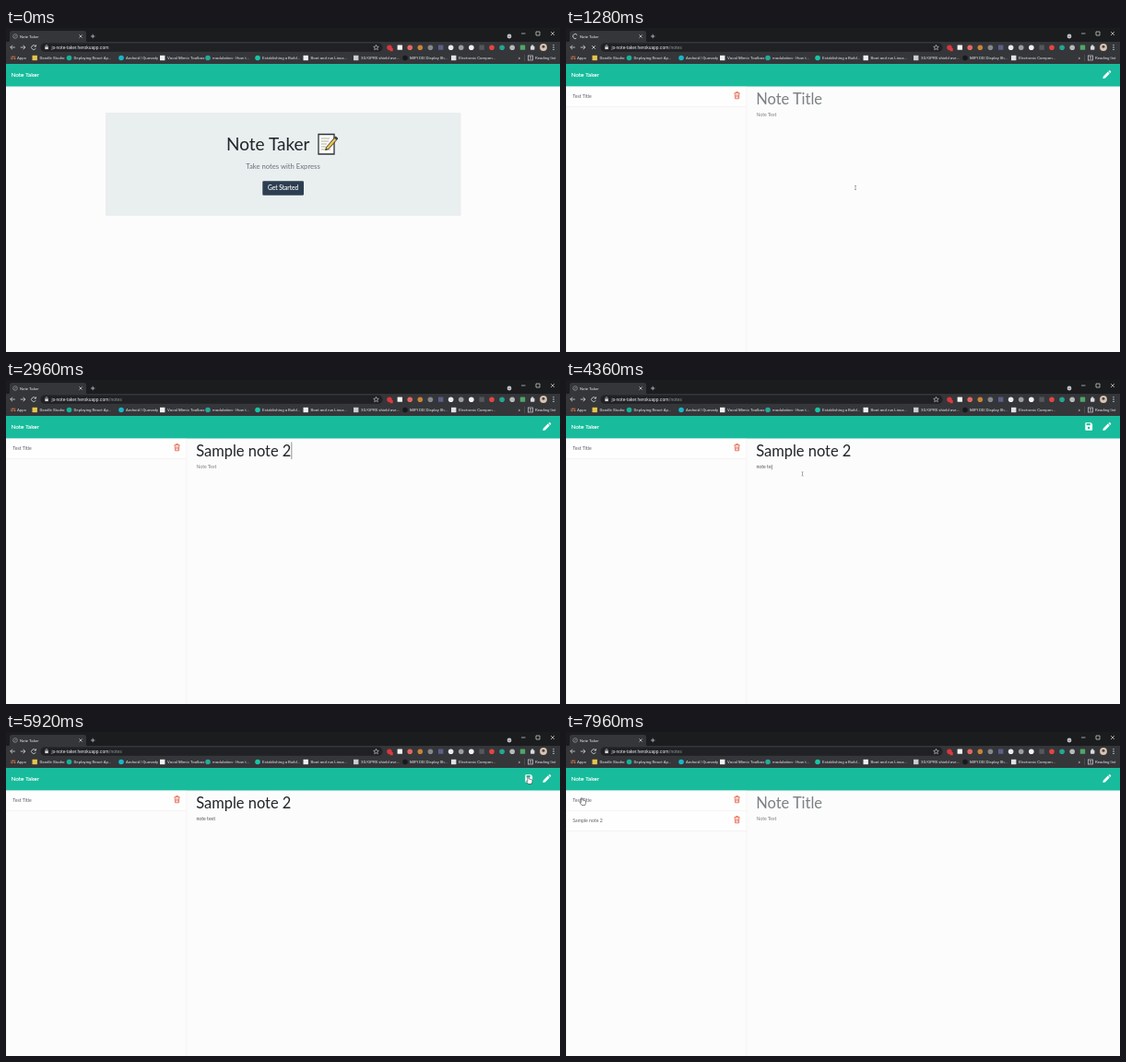
An HTML page for the animation above (8000 ms loop, 601 px wide and 352 px high).

```html
<!DOCTYPE html>
<html lang="en">
<head>
<meta charset="utf-8">
<title>Note Taker</title>
<style>
  html, body { margin: 0; width: 100%; height: 100%; overflow: hidden; background: #fcfcfc; }
  svg { display: block; width: 100vw; height: 100vh; }
  text { white-space: pre; }
  .ui { font-family: Roboto, "Open Sans", sans-serif; fill: #e4e5e8; }
  .page { font-family: Lato, sans-serif; }
</style>
</head>
<body>
<svg id="stage" viewBox="0 0 601 352" preserveAspectRatio="none"></svg>
<script>
const LOOP = 8000;
const TITLE = "Sample note 2", BODY = "note text";
const T = { show: 40, click: 700, load: 760, notes: 1120, ready: 1300, focus: 1640,
            type: 1840, textFocus: 3740, textType: 3860, blur: 5860, save: 6240 };

const rect = (x, y, w, h, fill, more = "") =>
  `<rect x="${x}" y="${y}" width="${w}" height="${h}" fill="${fill}" ${more}/>`;
const disc = (x, y, r, fill, more = "") => `<circle cx="${x}" cy="${y}" r="${r}" fill="${fill}" ${more}/>`;
const line = (d, color, w = .8, more = "") =>
  `<path d="${d}" fill="none" stroke="${color}" stroke-width="${w}" ${more}/>`;
const text = (x, y, size, str, more = "") => `<text x="${x}" y="${y}" font-size="${size}" ${more}>${str}</text>`;
const group = (id, inner, more = "") => `<g id="${id}" ${more}>${inner}</g>`;

function bookmarks() {
  const items = [
    [36.5, "Dandle Studio", "#e8c24a"], [73.5, "Deploying React Ap...", "#12b59a"],
    [130, "Android | Quovady", "#14b8c4"], [175, "Vocal Mimic Toolbox", "#f1f1f1"],
    [224, "modulation - How t...", "#2aa79b"], [278, "Establishing a Build...", "#19c3a6"],
    [330.5, "Boot and run Linux...", "#eeeeee"], [385, "3G/GPRS shield ove...", "#c9cdd0"],
    [438, "MIPI DSI Display Sh...", "#17181a"], [491, "Electronic Compon...", "#dfe1e4"]
  ];
  let out = "";
  for (let i = 0; i < 6; i++)
    out += rect(5.4 + i % 3 * 1.8, 30.6 + (i / 3 | 0) * 2, 1.2, 1.3, i % 2 ? "#e0b040" : "#dc5548");
  out += text(12, 34.2, 4.35, "Apps");
  items.forEach(([x, label, color], i) => {
    out += i % 3 === 0 || i === 7 ? rect(x - 8, 29.8, 5.4, 5.4, color) : disc(x - 5, 32.5, 2.8, color);
    out += text(x, 34.2, 4.35, label);
  });
  return out + text(555.5, 34.2, 5, "»") + rect(562, 29, .5, 7, "#5f6368") +
    rect(566.5, 30, 5, 5, "none", 'stroke="#d5d7da" stroke-width=".7"') +
    line("M568 31.5h2.2M568 33.2h2.2", "#d5d7da", .6) + text(574, 34.2, 4.3, "Reading list");
}

function extensions() {
  const colors = ["#d7373f", "#f2f2f2", "#e2685f", "#c9813a", "#85888c", "#5c5f86", "#e9ebed",
                  "#9a9da1", "#f4f4f4", "#55595d", "#e0473f", "#23a596", "#b7babd", "#4fa865"];
  return colors.map((c, i) => i % 4 === 1
    ? rect(413.5 + i * 11.1, 18.4, 5.4, 5.4, c, 'rx=".6"')
    : disc(416 + i * 11.1, 21.2, 2.8, c)).join("") +
    rect(416.5, 22, 3.2, 3.2, "#e23b3b") +
    rect(569, 19.6, 4.4, 4.2, "#d8dade", 'rx=".8"') + disc(571, 19.2, 1, "#d8dade") +
    disc(583, 21, 3.9, "#d9c5b0") + disc(583, 20.3, 1.5, "#4c4540") +
    [18.6, 21, 23.4].map(y => disc(594, y, .7, "#e4e5e8")).join("");
}

function browser() {
  const c = "#d8dade";
  return rect(0, 0, 601, 16, "#1b1c1e") +
    `<path d="M2 15.5q2 0 2-2v-8q0-2.500 2.500-2.500h78q2.500 0 2.500 2.500v8q0 2 2 2z" fill="#35363a"/>` +
    rect(0, 15, 601, 24.5, "#35363a") + rect(37.500, 16.500, 371, 9.300, "#202124", 'rx="4.600"') +
    group("favicon", disc(10, 9, 2.3, "none", `stroke="#8d9196" stroke-width=".8"`) + line("M8.5 10.5l3-3", "#8d9196", .6)) +
    group("spinner", line("M10 6.5a2.500 2.500 0 1 1 -2.500 2.500", "#d5d8dc", .8)) +
    text(15, 10.6, 4.25, "Note Taker") +
    line("M79.400 7.400l3.200 3.200m0-3.200l-3.200 3.200M92 9h4.400M94.200 6.800v4.400", c, .7) +
    disc(546, 9, 2.4, "#c5c8cb") + line("M545 8.500l1 1 1-1", "#202124", .6) +
    line("M559 6h4.500M575 4h4v4h-4zM591 4l4 4m0-4l-4 4", c, .7) +
    line("M9.800 21H4.800m2.200-2.300L4.700 21 7 23.300M15.800 21h5m-2.200-2.300L20.900 21l-2.300 2.300", c) +
    group("reload", line("M32 19.700a2.400 2.400 0 1 0 .3 2.300M32.500 18.300v1.800h-1.800", c)) +
    group("stop", line("M28.200 19.200l3.600 3.600m0-3.600l-3.600 3.600", c)) +
    rect(42.300, 20.300, 3.500, 2.800, c) + line("M43 20.300v-.7a1.050 1.050 0 0 1 2.100 0v.7", c, .6) +
    `<text x="49.500" y="22.700" font-size="4.900">js-note-taker.herokuapp.com<tspan id="path" fill="#8d9196">/notes</tspan></text>` +
    `<path d="M401.500 18.300l.8 1.900 2 .2-1.500 1.300.5 2-1.800-1.100-1.800 1.100.5-2-1.500-1.300 2-.2z" fill="none" stroke="${c}" stroke-width=".6"/>` +
    extensions() + bookmarks();
}

const memo = `<g transform="translate(337 114)">
  <path d="M2 1.500h17v21.500H2z" fill="#fdfdf8" stroke="#2f3336" stroke-width="1.300"/>
  <path d="M5 6h9M5 9h8M5 12h6M5 15h5M5 18h10" stroke="#a9a59a" stroke-width=".9"/>
  <path d="M10.500 15.500L20.500 4l2.500 2-10 11.500-3.300 1z" fill="#f3c24f" stroke="#2f3336" stroke-width=".9"/>
  <path d="M19 5.700L20.600 4l2.400 2-1.500 1.800z" fill="#3d4247"/>
  <path d="M9.700 18.500l.5-1.500 1.200 1z" fill="#2f3336"/></g>`;

const home = rect(108, 92, 385.5, 112, "#e9eeef") +
  text(239, 132.6, 19, "Note Taker", 'fill="#212529"') + memo +
  text(300.5, 153, 7.7, "Take notes with Express", 'fill="#6a7278" text-anchor="middle"') +
  rect(277.3, 165.3, 46.4, 17.4, "none", 'id="ring" rx="2" stroke="#8b96a1" stroke-width="1.400"') +
  rect(278.3, 166.3, 44.700, 15.400, "#2c3e50", 'id="button" rx="1.300"') +
  text(300.6, 176.4, 6.55, "Get Started", 'fill="#fff" text-anchor="middle" stroke="#fff" stroke-width=".12"');

const trash = y => `<g transform="translate(182 ${y})" fill="none" stroke="#e9694f" stroke-width=".9">
  <path d="M.5 1.700h6M2.400 1.500V.6h2.200v.9M1.100 2l.4 5.800h4l.4-5.800M2.800 3.300v3.200M4.300 3.300v3.200"/></g>`;
const row = (y, label) => rect(0, y, 196, 21.7, "#fefefe") + line(`M0 ${y + 21.700}h196`, "#eeeeef", .6) +
  text(7.300, y + 12.500, 5.2, label, 'fill="#5d6266"') + trash(y + 5.200);

const notes = group("list", row(63.8, "Test Title") + group("added", row(85.8, TITLE))) +
  line("M.3 64v288M196 64v288", "#efefef", .6) +
  text(206.300, 82.600, 16.43, "", 'id="title"') + text(206.500, 96.400, 5.15, "", 'id="body"') +
  rect(0, 67.500, .6, 18.500, "#4b4f52", 'id="titleCaret"') + rect(0, 92, .5, 5.500, "#4b4f52", 'id="bodyCaret"') +
  group("save", `<path d="M563.300 47q0-.8.8-.8h5.200l1.800 1.800v6q0 .8-.8.8h-6.200q-.8 0-.8-.8z" fill="#fff"/>` +
    rect(564.6, 47.2, 4.2, 2, "#18bc9c") + disc(567.1, 52.1, 1.25, "#18bc9c")) +
  `<path d="M582.300 55l.6-2.600 4.900-4.900 2 2-4.900 4.900zM588.300 47l.9-.8q.5-.4.9 0l1 1q.4.500 0 .9l-.9.900z" fill="#fff"/>`;

const pointers =
  group("arrow", `<path d="M0 0v7.200l1.700-1.500 1.100 2.500 1.100-.5-1.100-2.400h2.300z" fill="#fff" stroke="#222" stroke-width=".5"/>`) +
  group("hand", `<path d="M-.7 3.600V.4q.7-.9 1.400 0v2l3 .7q.700.200.700 1v1.800L3.600 8H.1l-2.200-2.800q.1-.9 1.400-.1z" fill="#fff" stroke="#222" stroke-width=".55"/>`) +
  group("beam", line("M-1-2.200q1 0 1 .6V1.600q0 .6 1 .6M1-2.200q-1 0-1 .6M-1 2.200q1 0 1-.6", "#55585b", .5));

document.getElementById("stage").innerHTML =
  rect(0, 0, 601, 352, "#fcfcfc") +
  group("browser", browser(), 'class="ui"') +
  group("content", rect(0, 39, 601, 24.500, "#18bc9c") +
    text(5.500, 53.400, 6.4, "Note Taker", 'fill="#fff" stroke="#fff" stroke-width=".12"') +
    group("home", home) + group("notes", notes), 'class="page"') +
  group("pointer", pointers);

const el = id => document.getElementById(id);
const show = (id, on) => el(id).setAttribute("display", on ? "inline" : "none");
const ease = p => p * p * (3 - 2 * p);

// time, x, y of the mouse
const path = [[40, 345, 311], [560, 314, 173.5], [1320, 314, 173.5], [1600, 257, 78.5],
  [3460, 257, 78.5], [3720, 256.5, 102], [5240, 256.5, 102], [5840, 566.5, 48.5],
  [6780, 566.5, 48.5], [7200, 320, 149], [7600, 24, 78], [7800, 17, 71.5], [LOOP, 17, 71.5]];

function mouse(t) {
  const i = Math.max(1, path.findIndex(p => p[0] > t));
  const [a, b] = [path[i - 1], path[i]];
  const p = ease(Math.max(0, (t - a[0]) / (b[0] - a[0])));
  return [a[1] + (b[1] - a[1]) * p, a[2] + (b[2] - a[2]) * p];
}

const typed = (str, t, start, step) => str.slice(0, Math.max(0, Math.floor((t - start) / step) + 1));

function field(id, value, hint, t, focus, blur, lastKey) {
  const node = el(id);
  node.textContent = value || hint;
  node.setAttribute("fill", value ? (id === "title" ? "#212529" : "#4f5458") : "#7b8084");
  const width = value ? node.getComputedTextLength() : 0;
  const caret = el(id + "Caret");
  caret.setAttribute("x", +node.getAttribute("x") + width + .3);
  const since = t < lastKey ? 0 : t - lastKey;
  show(id + "Caret", t >= focus && t < blur && Math.floor(since / 530) % 2 === 0);
}

function draw(t) {
  const onNotes = t >= T.notes, saved = t >= T.save;
  const loading = t >= T.load && t < T.ready;
  show("home", !onNotes);
  show("notes", onNotes);
  show("path", t >= T.load);
  show("favicon", !loading);
  show("spinner", loading);
  show("reload", !loading);
  show("stop", loading);
  el("spinner").setAttribute("transform", `rotate(${t * .4} 10 9)`);

  const title = saved ? "" : typed(TITLE, t, T.type, 88);
  const body = saved ? "" : typed(BODY, t, T.textType, 78);
  show("added", saved);
  show("save", title && body);
  if (onNotes) {
    field("title", title, "Note Title", t, T.focus, T.textFocus, T.type + 88 * 12);
    field("body", body, "Note Text", t, T.textFocus, T.blur, T.textType + 78 * 8);
  }

  const [x, y] = mouse(t);
  const onButton = !onNotes && x > 278 && x < 323 && y > 166 && y < 182;
  const hand = onButton || onNotes && (y < 63 && x > 560 || x < 196 && y > 64 && y < 108);
  const beam = onNotes && x > 204 && y > 64 && y < 200;
  el("button").setAttribute("fill", onButton ? "#1a252f" : "#2c3e50");
  show("ring", t >= T.click);
  show("pointer", t >= T.show);
  show("hand", hand);
  show("beam", beam && !hand);
  show("arrow", !hand && !beam);
  el("pointer").setAttribute("transform", `translate(${x} ${y})`);
}

const start = performance.now();
function tick() {
  draw((performance.now() - start) % LOOP);
  requestAnimationFrame(tick);
}
tick();
</script>
</body>
</html>
```
